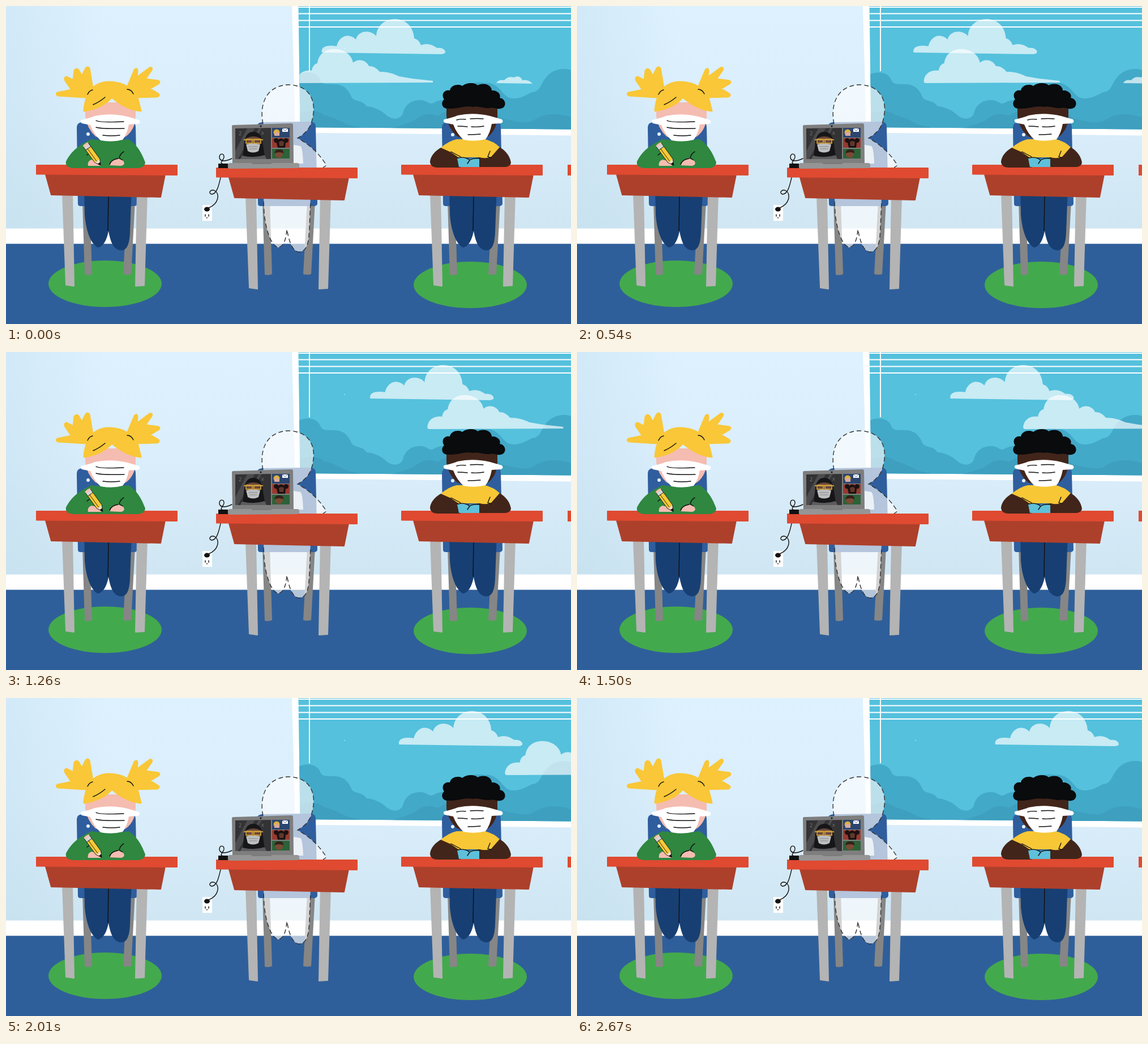
Write an HTML page that moves like this. It is 998 by 561 pixels and loops after 2700 ms.

```html
<!DOCTYPE html>
<html lang="en">
<head>
<meta charset="utf-8">
<title>Classroom</title>
<style>
html, body { margin: 0; width: 100%; height: 100%; overflow: hidden; }
svg { display: block; width: 100vw; height: 100vh; }
.line { fill: none; stroke: #111; stroke-width: 1.4; stroke-linecap: round; }
.dashed { stroke: #333; stroke-linecap: butt; stroke-dasharray: 8 5; }
.thin { stroke-width: .8; }
.cloud { fill: #fff; opacity: .68; }
.hair { fill: #f9c737; stroke: #f9c737; stroke-width: 3; stroke-linejoin: round; }
</style>
</head>
<body>
<svg viewBox="0 0 998 561">
<defs>
  <linearGradient id="wall" x2="0" y2="1">
    <stop offset="0" stop-color="#def1ff"/><stop offset=".45" stop-color="#dbeefc"/><stop offset="1" stop-color="#d0e6f3"/>
  </linearGradient>
  <linearGradient id="shade">
    <stop offset="0" stop-color="#b9dbeb" stop-opacity=".35"/><stop offset="1" stop-color="#b9dbeb" stop-opacity="0"/>
  </linearGradient>
  <clipPath id="glass"><path d="M516.500 0H998V217.500L519.500 214Z"/></clipPath>

  <g id="chair">
    <path fill="#868686" d="M135 345H148L152 473Q146 476 139 474ZM214 345H228L221 473Q214 475 207 473Z"/>
    <path fill="#2f5e9e" d="M125 214Q125 206 134 205L221 204Q229 205 229 213L232 349Q231 353 226 353H132Q127 353 127 349Z"/>
  </g>
  <g id="trousers">
    <path fill="#173f73" d="M138 320L139 368C141 395 149 419 162 426C173 425 179 409 181 397C184 412 188 429 202 431C214 432 218 420 219 400L222 320Z"/>
    <path class="line" d="M181 336L180 396"/>
  </g>
  <g id="frame" stroke-linejoin="round" stroke-width="2">
    <path fill="#b4b4b4" stroke="#b4b4b4" d="M100 330H117L120 494L106 492ZM232 330H249L244 493L229 494Z"/>
    <path fill="#ad402b" stroke="#ad402b" d="M70 297H281L273 337L80 333Z"/>
  </g>
  <path id="top" fill="#df4a31" stroke="#df4a31" stroke-width="2" stroke-linejoin="round" d="M54 281H302V298L54 296.500Z"/>
  <path id="mask" fill="#fff" d="M133 201Q147 198 157 194Q184 188 214 195L235 201Q239 206 233 208L217 209Q214 226 206 236Q187 241 167 237Q155 226 149 210L134 207Q130 203 133 201Z"/>
</defs>

<rect width="998" height="393" fill="url(#wall)"/>
<rect width="180" height="393" fill="url(#shade)"/>
<rect y="392.500" width="998" height="28" fill="#fff"/>
<rect y="419.500" width="998" height="142" fill="#2f5f9a"/>

<!-- Window -->
<path fill="#fff" d="M505 0H998V228.500L511 223.500Z"/>
<g clip-path="url(#glass)">
  <rect x="510" width="488" height="220" fill="#55c1dd"/>
  <path fill="#43a9c8" d="M515 122C530 114 549 116 555 130C558 140 569 137 578 138C598 137 606 150 611 162C618 170 629 165 637 177C650 178 662 184 669 190C680 201 695 202 701 190C704 174 717 165 733 166C745 167 748 175 755 171C768 163 776 168 784 160C800 140 828 131 845 136C866 133 875 152 885 160C900 168 916 159 929 152C945 151 944 137 954 126C964 113 982 108 998 113V220H515Z"/>
  <path fill="#3e9fbf" d="M515 193C530 181 553 184 561 192C575 196 588 201 602 209L640 218H515ZM675 218C700 209 716 207 727 198C740 188 753 190 763 194C784 180 812 174 826 189C845 180 865 186 875 198C898 203 914 209 930 203C950 189 970 188 998 196V220H675Z"/>
  <circle cx="598" cy="75" r=".8" fill="#d9f2f8"/>
  <path id="high" class="cloud" d="M558 82C555 71 570 68 584 71C588 54 604 46 618 59C622 43 643 41 654 53C655 34 670 23 687 23C706 23 720 37 721 57C728 59 731 64 733 69C747 64 757 71 761 74C769 73 776 76 776 82Q774 85 768 85Z"/>
  <path id="low" class="cloud" d="M514 134C514 121 524 112 540 114C541 107 545 102 550 101C552 84 565 76 580 76C598 76 611 87 613 100C624 91 637 97 641 106C650 106 656 111 660 116C674 116 684 119 694 124L717 128L754 132V135L516 136Z"/>
  <path id="small" class="cloud" d="M866 136Q871 129 880 131Q887 123 897 126Q908 121 912 131Q922 129 930 137Z"/>
  <path fill="none" stroke="#fff" stroke-width="2" d="M516 2H998M516 13.500H998M516 25.500H998M516 37H998M536 0V115"/>
</g>

<!-- Girl -->
<ellipse cx="175" cy="490" rx="100" ry="41" fill="#43a94d"/>
<use href="#chair"/><use href="#trousers"/><use href="#frame"/><use href="#top"/>
<circle cx="145" cy="226" r="3" fill="#e6f3fc"/>
<path fill="#2f8740" d="M151 235Q183 240 216 235C231 243 240 260 246 276Q245 286 231 286H119Q104 285 106 274C116 254 132 244 151 235Z"/>
<path fill="#f5bcb1" d="M140 170H229V195Q228 218 212 230Q185 242 158 230Q143 216 140 195Z"/>
<path class="hair" d="M153 145L147 110Q144 106 141 110L134 124L128 113Q124 109 121 114L119 131L107 125Q102 126 105 132L116 148L91 153Q87 156 92 158L140 161ZM214 144L227 113Q231 108 232 114L231 126L254 109Q259 108 257 113L246 129L269 132Q273 134 269 137L254 146L269 155Q272 158 267 160L227 161Z"/>
<path class="hair" d="M138 185C140 157 151 135 182 134C212 134 229 151 233 165L238 185Q212 182 187 161Q170 180 138 185Z"/>
<path class="line" d="M144 156Q147 149 153 148M214 147Q221 147 225 155M154 174Q164 170 175 161"/>
<use href="#mask"/>
<path class="line" d="M159 202Q166 206 208 204M159 214Q168 217 209 216M171 228Q186 230 201 228"/>
<path class="line" d="M143 263L151 257M208 257Q202 260 200 268L206 272"/>
<path fill="#f5bcb1" d="M145 282Q143 274 151 271L164 274L168 282ZM182 281Q185 271 198 269L207 273Q212 280 203 282Z"/>
<path class="line" d="M183 280Q185 271 198 269"/>
<g id="pencil">
  <g transform="translate(139.500 243) rotate(54)">
    <path fill="#f3c0b3" d="M1-5.500H5V5.500H1Q-1 0 1-5.500"/>
    <path fill="#d5d5d2" d="M4-5.500H10V5.500H4Z"/>
    <path fill="#f9c938" d="M10-5.500H37V5.500H10Z"/>
    <path fill="#f6dec0" d="M37-5.500L46-1V1L37 5.500Z"/>
    <path fill="#111" d="M42-3L48 0L42 3Z"/>
    <path class="line thin" d="M3-5.500H37L47 0L37 5.500H3M10 1.500H37M10-5V5"/>
  </g>
</g>
<path fill="#f5bcb1" d="M145 282Q144 275 150 273Q158 275 161 282Z"/>

<!-- Remote seat -->
<use href="#chair" x="318"/>
<g fill="#fff" fill-opacity=".64">
  <path d="M454 210C446 167 465 139 500 139C535 140 551 166 540 204Q535 222 515 233Q547 250 566 281L560 285V290H455Z"/>
  <path d="M455 335L456 365C459 395 467 420 480 426C490 425 495 412 496 397C500 413 504 431 517 434C533 433 535 415 536 390L538 335Z"/>
  <path fill-opacity=".75" d="M508 245L520 247Q524 250 525 278H508Z"/>
</g>
<g class="line dashed">
  <path d="M454 208C446 167 465 139 500 139C535 140 551 166 540 204Q535 222 515 233Q547 250 566 281L560 285"/>
  <path d="M455 345L456 365C459 395 467 420 480 426C490 425 495 412 496 394C500 413 504 431 517 434C533 433 535 415 536 390L538 345"/>
</g>
<use href="#frame" x="324" y="5"/><use href="#top" x="318" y="5"/>

<!-- Charger and outlet -->
<rect x="347" y="351" width="17" height="28" fill="#fff"/>
<path class="line" d="M399 269C389 274 379 275 377 268C376 259 386 259 385 267C384 273 376 276 383 279M379 303C376 315 373 332 363 332C356 330 362 322 369 326C378 331 376 349 358 356M352 368V371M358 368V371M355 373V374"/>
<ellipse cx="355" cy="358.500" rx="5" ry="4" fill="#111"/>
<rect x="375" y="278" width="17" height="8" fill="#111"/>

<!-- Laptop -->
<path fill="#7e7e7e" d="M399 212Q399 210 402 210L504 207Q507 207 507 210L508 278H400Z"/>
<path fill="#333335" d="M405 216L468 215V270H405Z"/>
<path fill="#4c4c4e" d="M426 216H439L410 270H405V256ZM447 215H452L421 270H416Z"/>
<g font-family="Open Sans, sans-serif" font-size="9" fill="#777"><text x="411" y="228">2</text><text x="451" y="227">x</text></g>
<path fill="#5c5c5e" d="M414 270Q417 260 429 258H447Q458 261 460 270Z"/>
<path fill="#161618" d="M418 264C422 250 417 222 437 222C456 222 453 249 457 263Q438 269 418 264Z"/>
<path fill="#6b483a" d="M425 233Q437 227 449 233L448 250Q436 264 426 250Z"/>
<path fill="none" stroke="#c4973c" stroke-width="2" d="M424 235H435V242H424ZM438 235H450V242H438ZM420 236H454"/>
<path fill="#bdbfc1" d="M424 244Q436 241 449 244L446 256Q436 261 427 256Z"/>
<path class="line thin" style="stroke:#777" d="M429 248H444M430 252H443"/>
<rect x="470" y="215" width="31" height="17" fill="#2b456f"/>
<rect x="470" y="233" width="31" height="17" fill="#96392f"/>
<rect x="470" y="252" width="31" height="17" fill="#2c6238"/>
<circle cx="478" cy="223" r="5.500" fill="#dcb03c"/>
<path fill="#d8aaa0" d="M474 224L478 221L483 225V229H474Z"/>
<path fill="#fff" d="M488 216H498V222H488Z"/>
<path class="line thin" style="stroke:#27477b" d="M488 216L493 220L498 216"/>
<path fill="#1a1112" d="M478 241a4 4 0 1 1 3-5Q486 231 491 236a4 4 0 1 1 3 5L493 250H480Z"/>
<path fill="#5f372b" d="M482 240Q487 236 491 240L490 247H483Z"/>
<circle cx="482" cy="261" r="7" fill="#7a4a34"/>
<path fill="#35201a" d="M474 260Q475 252 483 253Q491 253 490 260Q483 256 474 260Z"/>
<circle cx="450" cy="212" r="1.500" fill="#111"/>
<path fill="#959595" d="M392 280Q392 277 396 277H514Q518 277 518 280V284Q517 286 514 286L395 287Q391 286 392 280Z"/>
<path fill="#7c7c7c" d="M433 276H470L468 279H435Z"/>

<!-- Boy -->
<ellipse cx="820" cy="492" rx="100" ry="41" fill="#43a94d"/>
<use href="#chair" x="645"/><use href="#trousers" x="645"/><use href="#frame" x="650"/><use href="#top" x="645"/>
<circle cx="789" cy="227" r="3" fill="#e6f3fc"/>
<path fill="#42251a" d="M770 249C756 256 749 267 749 276Q751 286 765 285H803V262ZM870 248C884 255 891 267 892 277Q890 285 877 284H834V262Z"/>
<path fill="#f7c736" d="M768 250Q782 238 796 235H846Q862 239 872 249L857 266Q848 270 837 267H799L786 258Z"/>
<path fill="#5fc0da" d="M797 269Q808 265 818 270Q827 266 836 269V284H800Z"/>
<path class="line" d="M786 257L803 266M798 268Q811 265 819 272Q824 268 836 269M819 272L815 278M855 256L851 266L857 268"/>
<path fill="#42251a" d="M778 168H868V195Q867 218 852 230Q825 242 797 230Q781 216 778 195Z"/>
<path fill="#090b0d" d="M780 181C769 181 768 169 774 165C768 156 774 147 784 149C786 139 799 137 806 141C814 134 829 135 833 140C845 134 858 140 858 149C869 148 875 157 872 162C884 164 885 179 874 181C868 183 862 178 855 180C843 181 835 176 825 178C810 175 798 182 780 181Z"/>
<use href="#mask" x="641" y="-1"/>
<path class="line" d="M796 201Q804 199 812 200M820 199Q832 198 843 199M798 212Q806 212 815 213M822 213Q832 214 844 212M816 227Q828 227 838 226"/>
<rect x="992" y="280" width="6" height="19" fill="#df4a31"/>
</svg>
<script>
const LOOP = 2700, STEP = 30, SWAY = 900;
const shift = (id, x) =>
  document.getElementById(id).setAttribute("transform", `translate(${x} 0)`);

function draw() {
  const t = Math.floor(performance.now() % LOOP / STEP) * STEP;
  shift("high", t * 0.0678);
  shift("low", t * 0.1828);
  shift("small", t * 0.1828);
  shift("pencil", 2 - 2 * Math.cos(t / SWAY * 2 * Math.PI));
  requestAnimationFrame(draw);
}
draw();
</script>
</body>
</html>
```
